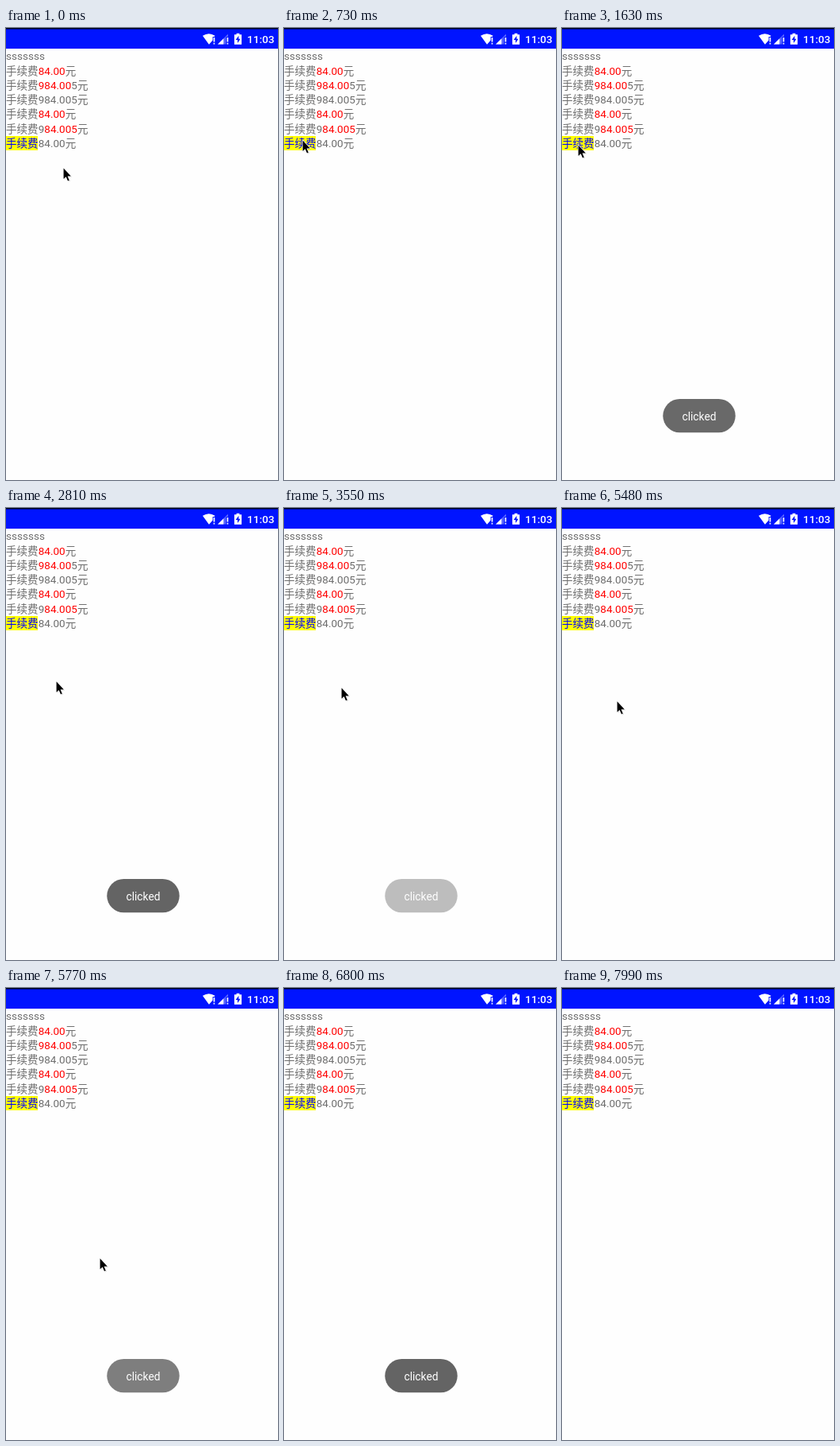
An HTML page for the animation above (8090 ms loop, 343 px wide and 569 px high).

```html
<!DOCTYPE html>
<html lang="zh-CN">
<head>
<meta charset="utf-8">
<title>Clickable text</title>
<style>
html, body { margin: 0; width: 100%; height: 100%; overflow: hidden; background: #fefefe; }
svg { display: block; width: 100%; height: 100%; }
text { font-family: Roboto, "Noto Sans CJK SC", "Noto Sans CJK JP", "Noto Sans CJK", sans-serif; white-space: pre; }
#lines { font-size: 13.55px; fill: #6d6d6d; }
.red { fill: #f00; }
.link { fill: #00f; }
</style>
</head>
<body>
<svg viewBox="0 0 343 569">
  <rect width="343" height="569" fill="#fefefe"/>
  <rect width="343" height="26" fill="#0014ff"/>
  <rect width="343" height="1.5" fill="#00041c"/>

  <g id="status" fill="#fff" transform="translate(0 -.5)">
    <path d="M248 10.3Q255.8 5.2 263.6 10.3L262.6 11.6H260.6V16L256 21.2Z"/>
    <path id="bang" d="M261.6 12.5h1.7v5.5h-1.7zM261.6 19.3h1.7v1.7h-1.7z"/>
    <path d="M267 21L280 8V11.5H277.5V21Z" opacity=".35"/>
    <path d="M267 21L274.3 13.7V21Z"/>
    <use href="#bang" x="17"/>
    <path d="M290.6 7.2h3.8v1.5h2.7v12.6h-9.2V8.7h2.7z"/>
    <path d="M293.4 10.3L289.6 15.6H292V19.6L295.6 14.2H293.4Z" fill="#0014ff"/>
    <text x="304" y="19.5" font-size="13.6" font-weight="500">11:03</text>
  </g>

  <rect id="mark" y="136" width="40" height="18" fill="#ff0"/>
  <g id="lines"></g>

  <g id="toast">
    <rect x="127.3" y="467" width="91.4" height="42.3" rx="21.15" fill="#646464"/>
    <text x="173" y="493.7" font-size="13.8" text-anchor="middle" fill="#fff">clicked</text>
  </g>

  <g id="cursor">
    <path d="M1 1.5V14.5L4.2 11.6L6.5 17L8.4 16.2L6.2 10.9H10.6Z" opacity=".18"/>
    <path d="M0 0V13.4L3.1 10.6L5.4 15.9L7.2 15.1L5 9.9H9.3Z" stroke="#fff" stroke-width="1.4" stroke-linejoin="round" paint-order="stroke"/>
  </g>
</svg>
<script>
const LOOP = 8090, STEP = 148, FADE = 500, TOAST = 1950;
const $ = id => document.getElementById(id);
const clamp = v => Math.min(1, Math.max(0, v));
const smooth = f => f * f * (3 - 2 * f);

// [..] is red, <..> is a link.
const lines = [
  'sssssss',
  '手续费[84.00]元',
  '手续费[984.00]5元',
  '手续费984.005元',
  '手续费[84.00]元',
  '手续费9[84.005]元',
  '<手续费>84.00元'
];
const markup = s => s.replace(/([[<])(.+?)[\]>]/g,
  (_, mark, run) => `<tspan class="${mark === '[' ? 'red' : 'link'}">${run}</tspan>`);
$('lines').innerHTML = lines.map((s, i) =>
  `<text x="0" y="${40.2 + 18.3 * i}">${markup(s)}</text>`).join('');

// Pointer moves: start, end, x, y
const home = [73, 177];
const moves = [
  [140, 730, 24, 142],
  [1180, 1630, 21, 148],
  [1930, 3110, 72, 232],
  [3110, 3550, 73, 227],
  [3550, 4140, 64, 150],
  [4290, 4730, 22, 156],
  [4730, 5030, 20, 146],
  [5180, 5770, 119, 341],
  [5770, 6360, 166, 323],
  [6360, 6650, 283, 535]
];
const GONE = 6800, MARK_OFF = 4140, MARK_ON = 5320;

function pointer(t) {
  let [px, py] = home;
  for (const [from, to, x, y] of moves) {
    const f = smooth(clamp((t - from) / (to - from)));
    px += (x - px) * f;
    py += (y - py) * f;
  }
  return `${Math.round(px) - .4} ${Math.round(py) - .4}`;
}

// Decelerating fade in, accelerating fade out.
function toastAlpha(t, show) {
  const a = clamp((t - show) / FADE), b = clamp((t - show - TOAST) / FADE);
  return (1 - (1 - a) ** 2) * (1 - b * b);
}

function draw(ms) {
  const t = Math.floor((ms % LOOP + 12) / STEP) * STEP;
  $('mark').style.display = t >= MARK_OFF && t < MARK_ON ? 'none' : '';
  $('toast').setAttribute('opacity', toastAlpha(t, 1220) + toastAlpha(t, 5480));
  $('cursor').style.display = t < GONE ? '' : 'none';
  $('cursor').setAttribute('transform', `translate(${pointer(t)})`);
}

const start = performance.now();
function tick() {
  draw(performance.now() - start);
  requestAnimationFrame(tick);
}
tick();
</script>
</body>
</html>
```
